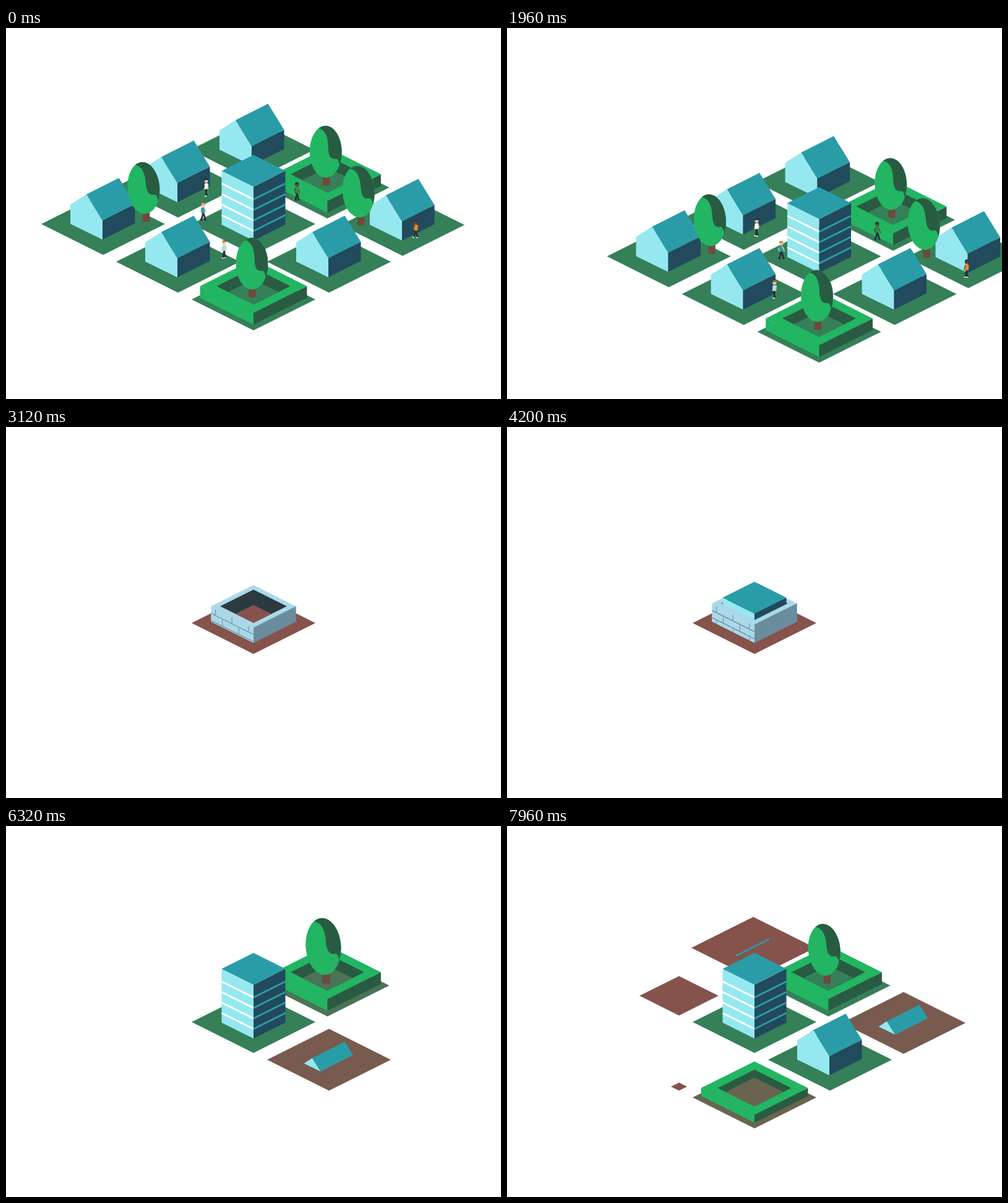
Write an HTML page that moves like this. It is 800x600 px and loops after 8 s.

```html
<!DOCTYPE html>
<html lang="en">
<head>
<meta charset="utf-8">
<title>Growing town</title>
<style>
  html, body { margin: 0; width: 100%; height: 100%; overflow: hidden; background: #fff; }
  svg { display: block; width: 100vw; height: 100vh; }
</style>
</head>
<body>
<svg id="stage" viewBox="0 0 800 600"></svg>
<script>
const LOOP = 8000, BUILD = 2437;
const GREEN = '#22b562', DARK = '#295b42';
const LIGHT = '#95e8f0', TEAL = '#2a9ca8', NAVY = '#214a5c';
const SOIL = [133, 83, 76], GRASS = [53, 128, 88];

// Lots from back to front; x, y is the front corner of the tile.
const lots = [
  { x: 398, y: 247, kind: house, start: 7300 },
  { x: 278, y: 306.5, kind: house, start: 7803 },
  { x: 519.5, y: 308, kind: park, start: 4690, tree: [-2.2, -53, -200] },
  { x: 400, y: 367, kind: tower, start: BUILD },
  { x: 157, y: 367, kind: house, start: 9000, tree: [69.5, -53.5, 700] },
  { x: 641, y: 368.5, kind: house, start: 7120, tree: [-67.5, -49, 1150] },
  { x: 278, y: 428, kind: house, start: 7936 },
  { x: 522, y: 428, kind: house, start: 5480 },
  { x: 400, y: 489, kind: park, start: 6696, tree: [-2, -53, -180] }
];
const colourStart = new Map([[house, 690], [park, 920], [tower, 2363]]);

// Feet position at the start, direction, and clothes.
const people = [
  { x: 324, y: 273, vx: -12.6, shirt: '#fff', skin: '#f2c3a5', hair: '#2b2b2b', shoe: '#fff' },
  { x: 318.5, y: 312, vx: 10.2, shirt: '#2a9ca8', skin: '#f2c3a5', hair: '#d9822b', shoe: '#263238' },
  { x: 353, y: 373, vx: -12.8, shirt: LIGHT, skin: '#f2c3a5', hair: '#b5622d', shoe: '#fff' },
  { x: 470, y: 279.5, vx: 12, shirt: '#2f8a50', skin: '#6b4034', hair: '#2b2b2b', shoe: '#263238' },
  { x: 662.5, y: 340, vx: -12.2, shirt: '#f08a24', skin: '#6b4034', hair: '#3a2a28', shoe: '#fff' }
];

const clamp = v => Math.max(0, Math.min(1, v));
const part = (t, start, length) => clamp((t - start) / length);
const outCubic = u => 1 - (1 - u) ** 3;
const outQuad = u => 1 - (1 - u) ** 2;
const inOut = u => (1 - Math.cos(Math.PI * u)) / 2;
const outBack = u => u <= 0 ? 0 : 1 + 3 * (u - 1) ** 3 + 2 * (u - 1) ** 2;
const mix = (a, b, u) => `rgb(${a.map((v, i) => Math.round(v + (b[i] - v) * u))})`;

const poly = (points, fill) =>
  `<polygon points="${points.map(p => p.map(v => v.toFixed(2)).join()).join(' ')}" fill="${fill}"/>`;
const diamond = (y, a, fill) => poly([[-a, y], [0, y - a / 2], [a, y], [0, y + a / 2]], fill);
const line = (x1, y1, x2, y2, stroke, width) =>
  `<path d="M${x1} ${y1}L${x2} ${y2}" stroke="${stroke}" stroke-width="${width}"/>`;
const group = (x, y, body, extra = '') => `<g transform="translate(${x} ${y})${extra}">${body}</g>`;

// Left and right walls of a box whose ground centre is y.
function walls(y, a, h, left, right) {
  const f = y + a / 2;
  return poly([[-a, y - h], [0, f - h], [0, f], [-a, y]], left) +
    poly([[a, y - h], [0, f - h], [0, f], [a, y]], right);
}

// Strip laid on the ground, spreading both ways round the square.
function strip(y, a, b, u, colour) {
  if (u <= 0) return '';
  const r = (a + b) / 4;
  return `<path transform="matrix(1 .5 -1 .5 0 ${y})" d="M${r} -10.5V${r}H${-r}V${-r}H${r}Z" fill="none"
    stroke="${colour}" stroke-width="${(a - b) / 2}" pathLength="100"
    stroke-dasharray="${u * 100} ${100 - u * 100}" stroke-dashoffset="${u * 50}"/>`;
}

// Hollow box seen from above; the floor shows the tile colour.
function ring(y, a, b, h, c, floor) {
  const top = y - h, x = b * (1 - h / b);
  return walls(y, a, h, c.left, c.right) + diamond(top, a, c.top) + diamond(top, b, c.inside) +
    poly([[0, y - b / 2], [x, top + h / 2], [0, top + b / 2], [-x, top + h / 2]], floor);
}

const hedge = { left: GREEN, top: GREEN, right: DARK, inside: DARK };
const masonry = { left: '#abd8e8', top: '#abd8e8', right: '#6a8d9e', inside: '#2a3a3e' };

function park(t, floor) {
  const spread = part(t, 380, 470);
  if (spread < 1) return strip(-52.5, 86.4, 59.5, spread, GREEN);
  return ring(-52.5, 86.4, 59.5, 19 * inOut(part(t, 900, 600)), hedge, floor);
}

function house(t) {
  const len = part(t, 500, 160), wide = part(t, 640, 390), h = 31 * inOut(part(t, 1030, 470));
  if (len <= 0) return '';
  const p = Math.max(wide, .04), gx = 26 * p, gy = 12.75 * p, mx = -27, my = -37.5;
  const rx = 52.5 * len, ry = -26.5 * len;
  const apex = [mx, my - h - 29.5 * p], back = [apex[0] + rx, apex[1] + ry];
  const front = [mx + gx, my + gy], eave = [front[0], front[1] - h];
  const far = [eave[0] + rx, eave[1] + ry];
  return poly([[mx - gx, my - gy], [mx - gx, my - gy - h], apex, eave, front], LIGHT) +
    poly([eave, far, [far[0], far[1] + h], front], NAVY) +
    poly([apex, back, far, eave], TEAL);
}

function bricks(y, a, h) {
  let out = '';
  for (let row = 0; row * 11.5 < h; row++) {
    const top = y - h + row * 11.5, low = Math.min(top + 11.5, y);
    if (row) out += line(-a, top, 0, top + a / 2, '#6f9bac', 1.4);
    for (let x = row % 2 ? 18 : 7; x < a; x += 26.7)
      out += line(x - a, top + x / 2 + 2, x - a, Math.max(top + 2, low) + x / 2, '#6f9bac', 1.3);
  }
  return out;
}

function block(h) {
  if (h <= 0) return '';
  const y = -49, a = 51.5, top = y - h;
  let out = walls(y, a, h, LIGHT, NAVY) + diamond(top, a, TEAL);
  for (let d = 20.5; d < h; d += 17) {
    out += line(-a, top + d, 0, top + d + a / 2, '#fff', 3) +
      line(0, top + d + a / 2, a, top + d, TEAL, 3);
  }
  return out;
}

function tower(t, floor) {
  const y = -52.25, a = 68.5, b = 54;
  const rise = block(87 * inOut(part(t, 1000, 1560)));
  const h = 29.5 * (outQuad(part(t, 263, 700)) - inOut(part(t, 1900, 500)));
  if (t < 263) return strip(y, a, b, part(t, 80, 180), masonry.top);
  if (h <= 0) return rise;
  const top = y - h;
  return ring(y, a, b, h, masonry, floor) + rise + walls(y, a, h, masonry.left, masonry.right) +
    poly([[-a, top], [0, top + a / 2], [a, top], [b, top], [0, top + b / 2], [-b, top]], masonry.top) +
    bricks(y, a, h);
}

function tree([x, y, peak], t, size) {
  if (size <= 0) return '';
  const angle = -2.4 + 2.4 * Math.cos((t - peak) / 1800 * 2 * Math.PI);
  return group(x, y, `<path d="M-5.7-16H5.7V-.8Q0 .8-5.7-.8Z" fill="#6f4939"/>
    <g transform="rotate(${angle})"><ellipse cy="-55" rx="26" ry="42" fill="${GREEN}"/>
    <path d="M-11-93C-2-91 4-81 4-64C4-50 7-43 14-43C18-43 20-44 22-33A26 42 0 0 0-11-93Z" fill="${DARK}"/></g>`,
    ` scale(${size})`);
}

function person(p, t, i) {
  const s = Math.sin(t / 150 + i * 1.3), dir = Math.sign(p.vx), leg = '#263238';
  const limb = (d, colour, w) => `<path d="${d}" fill="none" stroke="${colour}" stroke-width="${w}" stroke-linecap="round" stroke-linejoin="round"/>`;
  const step = k => {
    const foot = k * 3.4, lift = Math.max(0, -k * Math.cos(t / 150 + i * 1.3)) * 1.2;
    return limb(`M0-14L${foot / 2 + dir * .7} ${-7.5}L${foot} ${-1.8 - lift}`, leg, 2.7) +
      limb(`M${foot} ${-1 - lift}h${dir * 2}`, p.shoe, 1.6);
  };
  const arm = k => limb(`M${k > 0 ? 2.2 : -2.2}-20.5l${k * 2.2}  4l${dir * 1.2 - k * .6} 3.5`, p.skin, 1.5);
  return group(p.x + p.vx * t / 1000, p.y + Math.abs(p.vx) * t / 2000,
    arm(-s || 1) + step(s) + step(-s) +
    `<path d="M-3.2-21Q0-23.2 3.2-21L2.7-12.5H-2.7Z" fill="${p.shirt}"/>` + arm(s) +
    `<circle cx="${dir * .4}" cy="-25.6" r="3" fill="${p.skin}"/>
    <path d="M-3.3-25.8Q-3.4-30 0-30Q3.6-30 3.4-26.6Q0-28-3.3-25.8Z" fill="${p.hair}"/>`);
}

function tile(s, fill) {
  return s > 0 ? diamond(-50 * s, 100 * s, fill) : '';
}

function draw(t) {
  const town = t < BUILD;
  let ground = '', objects = '';
  for (const lot of lots) {
    const age = town ? 1e4 : t - lot.start;
    if (age <= 0) continue;
    const fill = mix(SOIL, GRASS, part(age, colourStart.get(lot.kind), 1000));
    ground += group(lot.x, lot.y, tile(outCubic(part(age, 0, 550)), fill));
    let body = lot.kind(age, fill);
    if (lot.tree) body += tree(lot.tree, t, outBack(part(age, 1350, 400)));
    objects += group(lot.x, lot.y, body);
  }
  if (town) objects += people.map((p, i) => person(p, t, i)).join('');
  const slide = town ? 1000 * part(t, 1537, 900) ** 3 : 0;
  stage.innerHTML = group(slide, slide / 2, ground + objects);
}

const stage = document.getElementById('stage');
const began = performance.now();
function tick() {
  draw((performance.now() - began) % LOOP);
  requestAnimationFrame(tick);
}
tick();
</script>
</body>
</html>
```
